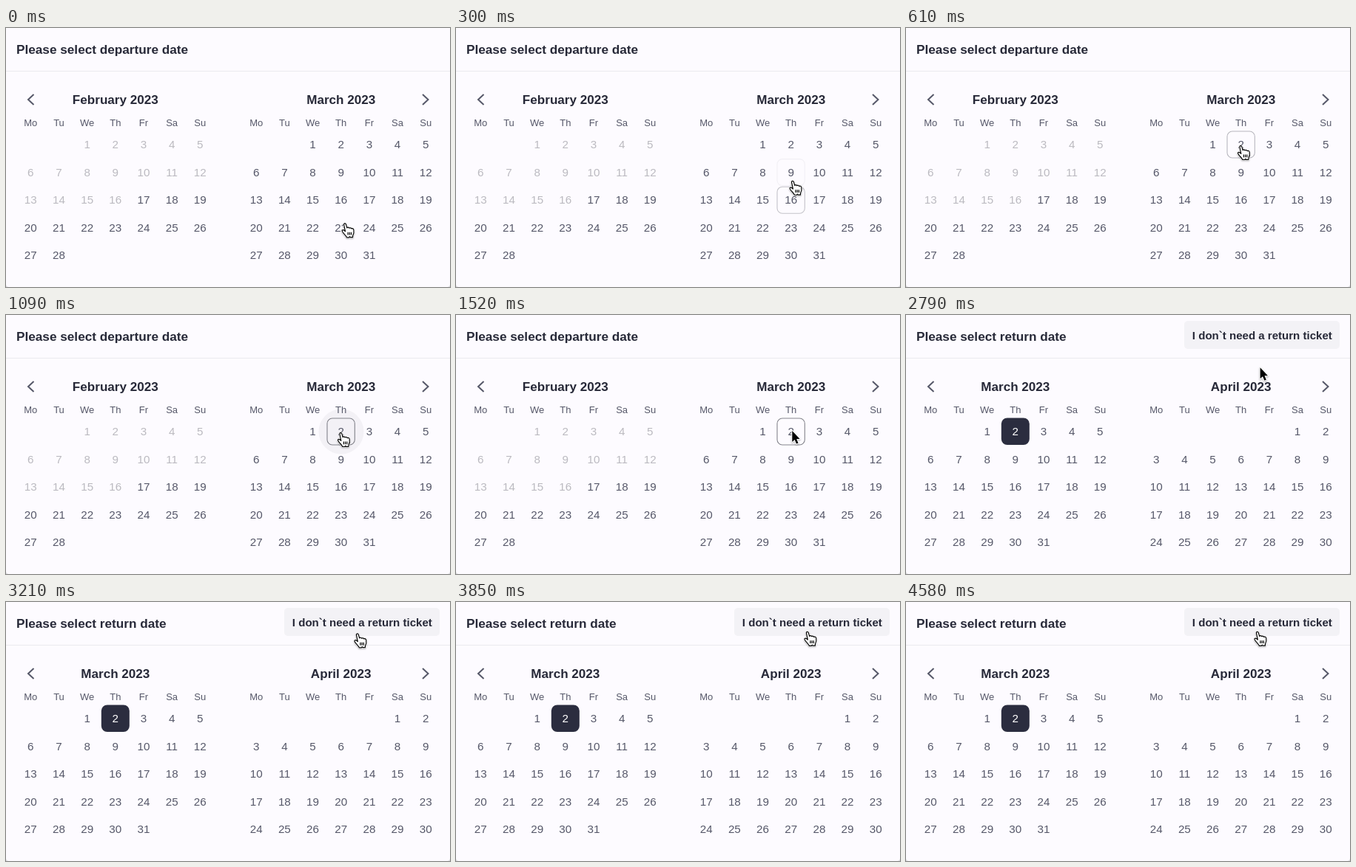
Write an HTML page with a canvas that moves like this. It is 600x351 px and loops after 4.64 s.

```html
<!DOCTYPE html>
<html lang="en">
<head>
<meta charset="utf-8">
<title>Date picker</title>
<style>
html, body { margin: 0; width: 100%; height: 100%; overflow: hidden; background: #fdfbff; }
canvas { display: block; }
</style>
</head>
<body>
<canvas id="stage" width="600" height="351"></canvas>
<script>
const ctx = document.getElementById('stage').getContext('2d');
const LOOP = 4640, PRESS = 1520, SWITCH = 1550, ENTER = 3090;
const DARK = '#272938', INK = '#565869', DIM = '#bbbac0', PAPER = '#fdfbff';
const COL = 38.17, ROW = 37.6, TOP = 158, LEFT = 33.3, RIGHT = 338.2;
const WEEK = ['Mo', 'Tu', 'We', 'Th', 'Fr', 'Sa', 'Su'];
const FEB = { name: 'February 2023', start: 2, days: 28, past: 16 };
const MAR = { name: 'March 2023', start: 2, days: 31, past: 0 };
const APR = { name: 'April 2023', start: 5, days: 30, past: 0 };

const HAND = new Path2D('M3.2 3C2.7.9 5.4.3 6 2.3L7.3 7C8.2 6 9.9 6.2 10.2 7.4C11.3 6.5 12.9 7 13.2 8.1' +
  'C14.6 7.4 16.2 8 16.4 10C16.9 13 16.8 14.6 15.3 17L15 19.8H11.9L11 18.8L10 20H7' +
  'C6 17.6 4 16 2.6 14.3C1 12.4 0 11.2 1 10.2C2 9.4 3.6 10.2 5 11.8Z');
const FINGERS = new Path2D('M8.6 13v3.8M10.8 13v3.8M13 13v3.8');
const ARROW = new Path2D('M0 0V15L3.4 11.9L5.7 17.5L8.2 16.4L5.9 11H10.4Z');

const clamp = v => Math.max(0, Math.min(1, v));

// Value moving from a to b; a higher power slows the end more
function glide(t, start, end, a, b, power = 1) {
  return a + (b - a) * (1 - (1 - clamp((t - start) / (end - start))) ** power);
}

function text(str, x, y, size, color, weight = '', align = 'center') {
  ctx.font = `${weight} ${size}px "Liberation Sans", Arial, sans-serif`;
  ctx.textAlign = align;
  ctx.fillStyle = color;
  ctx.fillText(str, x, y);
}

function box(x, y, w, h, r) {
  ctx.beginPath();
  ctx.roundRect(x, y, w, h, r);
}

function chevron(x, dir) {
  ctx.beginPath();
  ctx.moveTo(x - 4 * dir, 90);
  ctx.lineTo(x + 3.5 * dir, 97);
  ctx.lineTo(x - 4 * dir, 104);
  ctx.strokeStyle = INK;
  ctx.lineWidth = 2;
  ctx.stroke();
}

function month(m, left, selected) {
  text(m.name, left + 3 * COL, 103, 17.1, DARK, 'bold');
  WEEK.forEach((d, i) => text(d, left + i * COL, 133, 13, INK));
  for (let d = 1; d <= m.days; d++) {
    const i = d + m.start - 1;
    const x = left + i % 7 * COL, y = TOP + Math.floor(i / 7) * ROW;
    if (d === selected) {
      box(x - 19, y - 18.5, 38, 36.5, 8);
      ctx.fillStyle = '#2b2d3f';
      ctx.fill();
    }
    text(d, x, y + 5, 15.2, d === selected ? '#fff' : d <= m.past ? DIM : INK);
  }
}

// The pointer climbs one column at constant speed, lighting each cell it crosses
function hovers(t) {
  const pace = 180;
  for (let row = 0; row < 4; row++) {
    const from = row === 3 ? 0 : 458 - row * pace;
    const to = row ? 458 - (row - 1) * pace : SWITCH;
    const alpha = clamp((Math.min(t, to) - from) / 270) - Math.max(0, t - to) / 120;
    if (alpha <= 0) continue;
    ctx.globalAlpha = alpha;
    box(434, TOP - 18 + row * ROW, 37.3, 36, 7);
    ctx.strokeStyle = '#85858d';
    ctx.lineWidth = 1.1;
    ctx.stroke();
    ctx.globalAlpha = 1;
  }
}

function ripple(t, start, x, y) {
  const p = (t - start) / 220;
  if (p < 0 || p >= 1) return;
  ctx.beginPath();
  ctx.arc(x, y, 14 + 24 * p, 0, 2 * Math.PI);
  ctx.fillStyle = `rgba(70, 70, 90, ${0.18 * (1 - p)})`;
  ctx.fill();
}

function cursor(shape, x, y) {
  const arrow = shape === ARROW;
  ctx.save();
  ctx.translate(x, y);
  ctx.lineJoin = 'round';
  ctx.shadowColor = 'rgba(0, 0, 0, .3)';
  ctx.shadowBlur = 2;
  ctx.shadowOffsetY = 1;
  ctx.strokeStyle = '#fff';
  ctx.lineWidth = 2.2;
  ctx.stroke(shape);
  ctx.shadowColor = 'transparent';
  ctx.fillStyle = arrow ? '#000' : '#fff';
  ctx.fill(shape);
  if (!arrow) {
    ctx.strokeStyle = '#000';
    ctx.lineWidth = 1.2;
    ctx.stroke(shape);
    ctx.stroke(FINGERS);
  }
  ctx.restore();
}

function pointer(t) {
  if (t < PRESS) {
    cursor(HAND, glide(t, 0, 550, 453.5, 447.8), glide(t, 0, 550, 264, 158.5));
  } else if (t < ENTER) {
    cursor(ARROW, glide(t, 2520, 3060, 454.3, 479, 6), glide(t, 2520, 3060, 157, 51.5, 2.4));
  } else {
    cursor(HAND, 470.3, glide(t, ENTER, 3390, 46.5, 39.3, 2));
  }
}

function draw(t) {
  const returning = t >= SWITCH;
  ctx.fillStyle = '#d8d8dc';
  ctx.fillRect(0, 0, 600, 351);
  box(0, 0, 600, 351, [0, 0, 4, 4]);
  ctx.fillStyle = PAPER;
  ctx.fill();
  ctx.fillStyle = '#ebebef';
  ctx.fillRect(0, 58, 600, 1);

  text(`Please select ${returning ? 'return' : 'departure'} date`, 14, 34.5, 17.2, DARK, 'bold', 'left');
  if (returning) {
    box(376, 8, 210, 38, 5);
    ctx.fillStyle = '#f3f2f6';
    ctx.fill();
    text('I don`t need a return ticket', 481.3, 32.5, 15.05, DARK, 'bold');
  }
  chevron(33.5, -1);
  chevron(567, 1);
  month(returning ? MAR : FEB, LEFT, returning ? 2 : 0);
  month(returning ? APR : MAR, RIGHT, 0);
  if (!returning) hovers(t);
  ripple(t, 940, 453, 158);
  ripple(t, 4360, 476, 39.5);
  pointer(t);
}

const begin = performance.now();
function tick() {
  draw((performance.now() - begin) % LOOP);
  requestAnimationFrame(tick);
}
tick();
</script>
</body>
</html>
```
